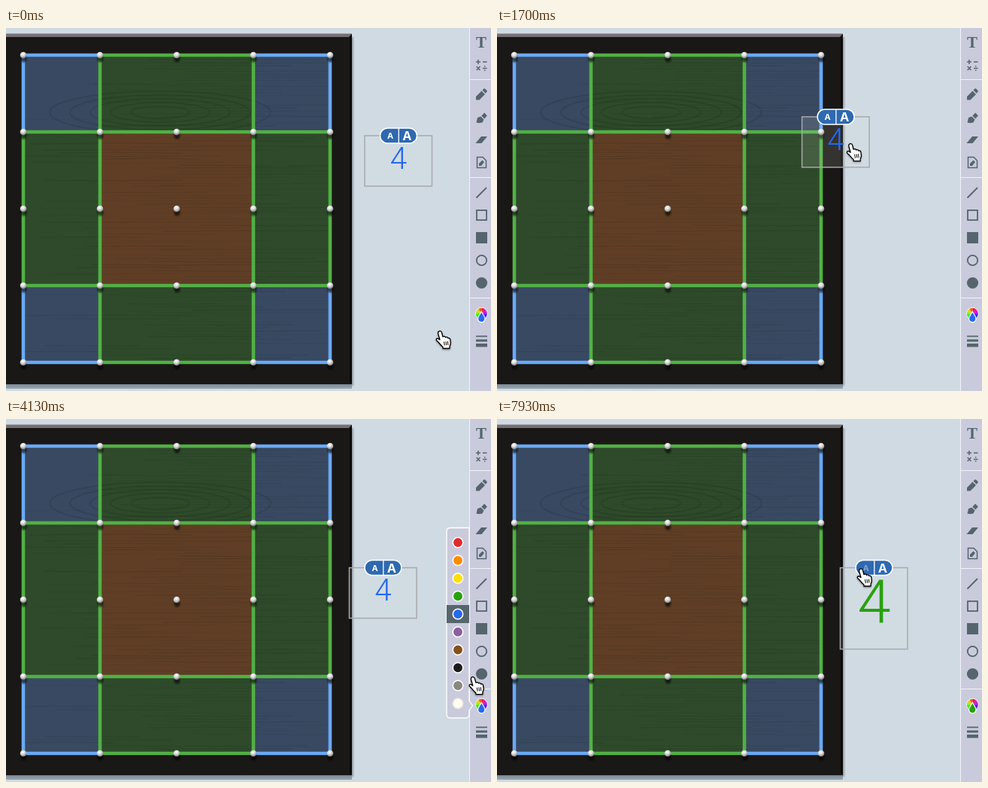
Animation, 645 px wide and 482 px high, one loop 8000 ms. Source, as an HTML page:

```html
<!DOCTYPE html>
<html lang="en">
<head>
<meta charset="utf-8">
<title>Geoboard label</title>
<style>
html, body { margin: 0; width: 100%; height: 100%; overflow: hidden; background: #cfdae3; }
svg { display: block; }
text { text-anchor: middle; }
.a { font: 700 12px Inter, Roboto, sans-serif; fill: #fff; }
.icon { fill: #56656d; stroke: #56656d; stroke-width: 0; }
.line { fill: none; stroke: #56656d; stroke-width: 1.8; }
</style>
</head>
<body>
<svg width="645" height="482" viewBox="0 0 645 482">
  <defs>
    <radialGradient id="pin" cx=".42" cy=".3" r=".7">
      <stop offset="0" stop-color="#fff"/><stop offset=".5" stop-color="#d6d6d6"/><stop offset="1" stop-color="#777"/>
    </radialGradient>
    <linearGradient id="fade" x2="0" y2="1">
      <stop offset="0" stop-color="#72818c"/><stop offset="1" stop-color="#9aa9b4"/>
    </linearGradient>
    <filter id="soft" x="-1" y="-1" width="3" height="3"><feGaussianBlur stdDeviation="1.3"/></filter>
    <filter id="drop" x="-.5" y="-.5" width="2" height="2">
      <feDropShadow dx="0" dy="1.2" stdDeviation="1" flood-opacity=".4"/>
    </filter>
    <clipPath id="inside"><rect x="23" y="36" width="408" height="408"/></clipPath>
  </defs>

  <rect x="455" y="12" width="7" height="463" fill="#56606a" filter="url(#soft)" opacity=".5"/>
  <rect y="472" width="460" height="7" fill="url(#fade)"/>
  <rect y="8" width="460" height="465" fill="#1a1816"/>
  <path d="M0 7.5H460L456 12H0z" fill="#766f73"/>
  <path d="M460 8V473L457 470V12z" fill="#0b0a0a"/>
  <g id="board"></g>
  <g id="grain" fill="none" stroke="#000" clip-path="url(#inside)"></g>
  <g id="bands" fill="none" stroke-width="4.6"></g>
  <g id="pins"></g>

  <rect x="616" width="29" height="482" fill="#c9cbdc"/>
  <path d="M616.5 0V482M617 68.5H645M617 198.5H645M617 358.5H645" stroke="#f1f2f7"/>
  <g class="icon">
    <text x="632" y="25.5" style="font:700 21px 'Liberation Serif','Noto Serif',serif">T</text>
    <path d="M625 95.500v-4.500l7.500-7.500 4.500 4.500-7.500 7.500zM633.500 82.500l2-2q1-.5 2 .5l2 2q.8 1-.2 2l-1.600 1.700z"/>
    <path d="M625.500 125.500l1.500-6.500 4.500-1.500 4 4-2 4-4.500.8zM632.300 116.500l4-4 3.500 4-3.500 4z"/>
    <path d="M624.500 153l7.500-9h8l-7.500 9z"/>
    <path d="M629 183v-3l4.500-4.500 2.500 2.500-4 5z"/>
    <rect x="625" y="271" width="15" height="15"/>
    <circle cx="632.500" cy="338.500" r="7.600"/>
    <path d="M625 408.500h15v1.800h-15zM625 413.500h15v3h-15zM625 419h15v4.500h-15z"/>
  </g>
  <g class="line">
    <path d="M625 45h6M628 42v6M634 45h5.500M625.700 51l4.800 5M630.500 51l-4.800 5M634 53.500h5.500M636.700 50v1.500M636.700 55.500v1.500" stroke-width="1.500"/>
    <path d="M626.500 171.500h7.500l4.500 4.500v9.500h-12z" stroke-width="1.500"/>
    <path d="M625.500 225.500L639 212"/>
    <rect x="626" y="242" width="13" height="13"/>
    <circle cx="632.500" cy="308.500" r="6.700"/>
  </g>
  <g id="wheel"></g>
  <path id="tint" d="M632.300 376.500C634 380 637 383 637 386a4.700 4.700 0 0 1-9.400 0C627.600 383 630.600 380 632.300 376.500z" stroke="#fff" stroke-width="1.200"/>

  <g id="palette">
    <path d="M617 144.500H591Q586 144.500 586 149.500V392Q586 397 591 397H611Q616 397 616 392V387L620.500 380.500 616 374V144.500" fill="#c9cbdc" stroke="#fff" stroke-width="1.300"/>
    <rect id="pick" x="586" width="30" height="24" fill="#58666c"/>
  </g>

  <g id="label">
    <rect id="frame" width="89.500" fill="#dce4d8" fill-opacity=".13" stroke="#a8a9ab" stroke-width="1.500"/>
    <text id="digit" x="45" font-family="Roboto, Lato, sans-serif" font-weight="300">4</text>
    <rect x="20.500" y="-10" width="49" height="20" rx="10" fill="#2e69b1" stroke="#fff" stroke-width="1.500"/>
    <path d="M45.300 -10V10" stroke="#fff" stroke-width="1.300"/>
    <text id="less" class="a" x="34" y="4.200" style="font-size:11px">A</text>
    <text id="more" class="a" x="56.500" y="6" style="font-size:16.500px">A</text>
  </g>

  <g id="hand" filter="url(#drop)" stroke="#000" stroke-linejoin="round">
    <path d="M4 2.500C5.500 .5 8 1.200 8.500 3.500L10 9C11.200 8 13 8.300 13.400 9.800C14.600 8.900 16.300 9.400 16.700 10.900C18 10.200 19.500 11 19.700 12.500L20.300 17C20.500 19 19 20.500 19 22.500V24.500H10V22.500C6.500 20 5 16.500 2 14.200C.3 12.800 1.500 10.800 3.600 11.400L6 13L3.700 5C3.400 4 3.500 3.100 4 2.500Z" fill="#fff" stroke-width="1.300"/>
    <path d="M11.500 15.500l.8 5M14 15.200l.7 5M16.400 15l.5 5" stroke-width="1"/>
  </g>
  <path id="arrow" d="M0 0V18.500L4.300 14.500 7.200 21.300 10.400 20 7.500 13.400H13z" transform="translate(0 0)" fill="#000" stroke="#fff" stroke-width="1.200" filter="url(#drop)"/>
</svg>
<script>
const $ = id => document.getElementById(id);
const add = (id, tag, attrs) => {
  const el = document.createElementNS('http://www.w3.org/2000/svg', tag);
  for (const k in attrs) el.setAttribute(k, attrs[k]);
  $(id).append(el);
};

// Board: 4 x 4 units of 102 px, bands on units 0, 1, 3 and 4
const U = n => 102 * n;
const X = n => 23 + U(n), Y = n => 36 + U(n);
const spans = [[0, 1], [1, 3], [3, 4]];
spans.forEach(([x0, x1], i) => spans.forEach(([y0, y1], j) => add('board', 'rect', {
  x: X(x0), y: Y(y0), width: U(x1 - x0), height: U(y1 - y0),
  fill: ['#5f3e25', '#2e4a2a', '#384961'][(i !== 1) + (j !== 1)]
})));

let seed = 7;
const rnd = () => (seed = seed * 16807 % 2147483647) / 2147483647;
for (let y = 38; y < 444; y += 4) {
  const x = rnd() * 260, w = 120 + rnd() * 200;
  add('grain', 'path', { d: `M${x} ${y}q${w / 2} ${rnd() * 5 - 2.5} ${w} 0`, 'stroke-opacity': .04 + rnd() * .08 });
}
for (let r = 1; r < 6; r++)
  add('grain', 'ellipse', { cx: 205, cy: 112, rx: 12 + r * 27, ry: 3 + r * 5, 'stroke-opacity': .1, 'stroke-width': 2 });

const band = (x0, y0, x1, y1, stroke) =>
  add('bands', 'path', { d: `M${X(x0)} ${Y(y0)}L${X(x1)} ${Y(y1)}`, stroke });
for (const e of [0, 4]) for (const [a, b] of spans) {
  const color = b - a === 2 ? '#52b045' : '#69a9f6';
  band(a, e, b, e, color);
  band(e, a, e, b, color);
}
for (const e of [1, 3]) {
  band(e, 0, e, 4, '#52b045');
  band(0, e, 4, e, '#52b045');
}
for (let i = 0; i < 5; i++) for (let j = 0; j < 5; j++) {
  add('pins', 'ellipse', { cx: X(i) + .5, cy: Y(j) + 5, rx: 4, ry: 4.5, opacity: .6, filter: 'url(#soft)' });
  add('pins', 'circle', { cx: X(i), cy: Y(j), r: 4.3, fill: 'url(#pin)' });
}

// Colour wheel and swatches
const at = (a, r) => `${632.3 + r * Math.sin(a)} ${379.3 - r * Math.cos(a)}`;
add('wheel', 'circle', { cx: 632.3, cy: 379.3, r: 8.2, fill: '#fff' });
for (let i = 0; i < 12; i++) {
  const a = i * Math.PI / 6;
  add('wheel', 'path', { d: `M632.3 379.3L${at(a, 7.5)}A7.5 7.5 0 0 1 ${at(a + .54, 7.5)}z`, fill: `hsl(${350 - i * 30} 85% 50%)` });
}
const BLUE = '#2868ee', GREEN = '#29a00f';
['#e02b2b', '#ff8c00', '#ffe000', GREEN, BLUE, '#8c5fa0', '#85501c', '#1c1c1c', '#8a8680', '#fffcf0'].forEach((fill, i) =>
  add('palette', 'circle', { cx: 601, cy: 164 + i * 23.75, r: 6.7, fill, stroke: i < 9 ? '#fff' : '#e9e7de', 'stroke-width': 1.5 }));

// Motion: rows are [time, x, y]
const clamp = v => Math.max(0, Math.min(1, v));
const smooth = p => p * p * (3 - 2 * p);
const segment = (keys, t) => {
  let i = 0;
  while (i < keys.length - 2 && t >= keys[i + 1][0]) i++;
  return [i, clamp((t - keys[i][0]) / (keys[i + 1][0] - keys[i][0]))];
};

const drag = [
  [1050, 477, 143], [1150, 440, 185], [1240, 386, 220], [1330, 331, 222], [1363, 307, 211],
  [1450, 271, 180], [1550, 307, 140], [1700, 405, 118], [1733, 419, 123], [1830, 429, 146],
  [2000, 448, 181], [2160, 456.5, 197.5]
];
function spline(keys, t) {
  const [i, p] = segment(keys, t), a = keys[i], b = keys[i + 1];
  const slope = (k, c) => keys[k - 1] && keys[k + 1] ?
    (keys[k + 1][c] - keys[k - 1][c]) / (keys[k + 1][0] - keys[k - 1][0]) * (b[0] - a[0]) : 0;
  return [1, 2].map(c => {
    const q = 1 - p;
    return a[c] * q * q * (1 + 2 * p) + slope(i, c) * p * q * q
         + b[c] * p * p * (3 - 2 * p) - slope(i + 1, c) * p * p * q;
  });
}

const moves = [
  [0, 571, 401], [200, 571, 401], [760, 522, 172], [2160, 501.5, 226.5], [2700, 501.5, 226.5],
  [3200, 621, 375], [3900, 621, 375], [4700, 596, 237], [5330, 596, 237], [5930, 507, 197.5],
  [7300, 507, 197.5], [7600, 478, 197.5]
];
function pointer(t) {
  if (t > 760 && t < 2160) {       // the label trails the pointer by one tick
    const [x, y] = spline(drag, t + 33);
    return [x + 45, y + 29];
  }
  const [i, p] = segment(moves, t), e = (p + smooth(p)) / 2;
  return [1, 2].map(c => moves[i][c] + (moves[i + 1][c] - moves[i][c]) * e);
}

const clicks = [[6200, 16.3], [6730, 22.8], [7130, 25.4], [7760, -25.4]];
const fontSize = t => clicks.reduce((s, [t0, d]) => s + d * smooth(clamp((t - t0) / 170)), 40.5);

function draw(t) {
  const [bx, by] = spline(drag, t), size = fontSize(t), height = 67 + (size - 40.5) * 1.05;
  $('label').setAttribute('transform', `translate(${bx} ${by})`);
  $('frame').setAttribute('height', height);
  $('digit').setAttribute('font-size', size);
  $('digit').setAttribute('y', 14 + size * .74);
  $('digit').setAttribute('fill', t < 5360 ? BLUE : GREEN);
  $('more').setAttribute('opacity', t >= 6200 && t < 7760 ? .4 : 1);
  $('less').setAttribute('opacity', t >= 7760 ? .4 : 1);

  const open = t >= 3700 && t < 6200;
  $('palette').style.display = open ? '' : 'none';
  $('pick').setAttribute('y', t < 5330 ? 247 : 223.5);
  $('tint').setAttribute('fill', t < 5330 ? BLUE : GREEN);

  const [x, y] = pointer(t), hx = x + 5, hy = y + 1;
  const onLabel = hx > bx && hx < bx + 90 && hy > by - 10 && hy < by + height;
  const hand = t <= 200 || onLabel || hx > (open ? 586 : 616) || (t > 760 && t < 2700);
  $('hand').style.display = hand ? '' : 'none';
  $('arrow').style.display = hand ? 'none' : '';
  $('hand').setAttribute('transform', `translate(${x} ${y})`);
  $('arrow').setAttribute('transform', `translate(${hx} ${hy})`);
}

function tick() {
  draw(performance.now() % 8000);
  requestAnimationFrame(tick);
}
tick();
</script>
</body>
</html>
```
